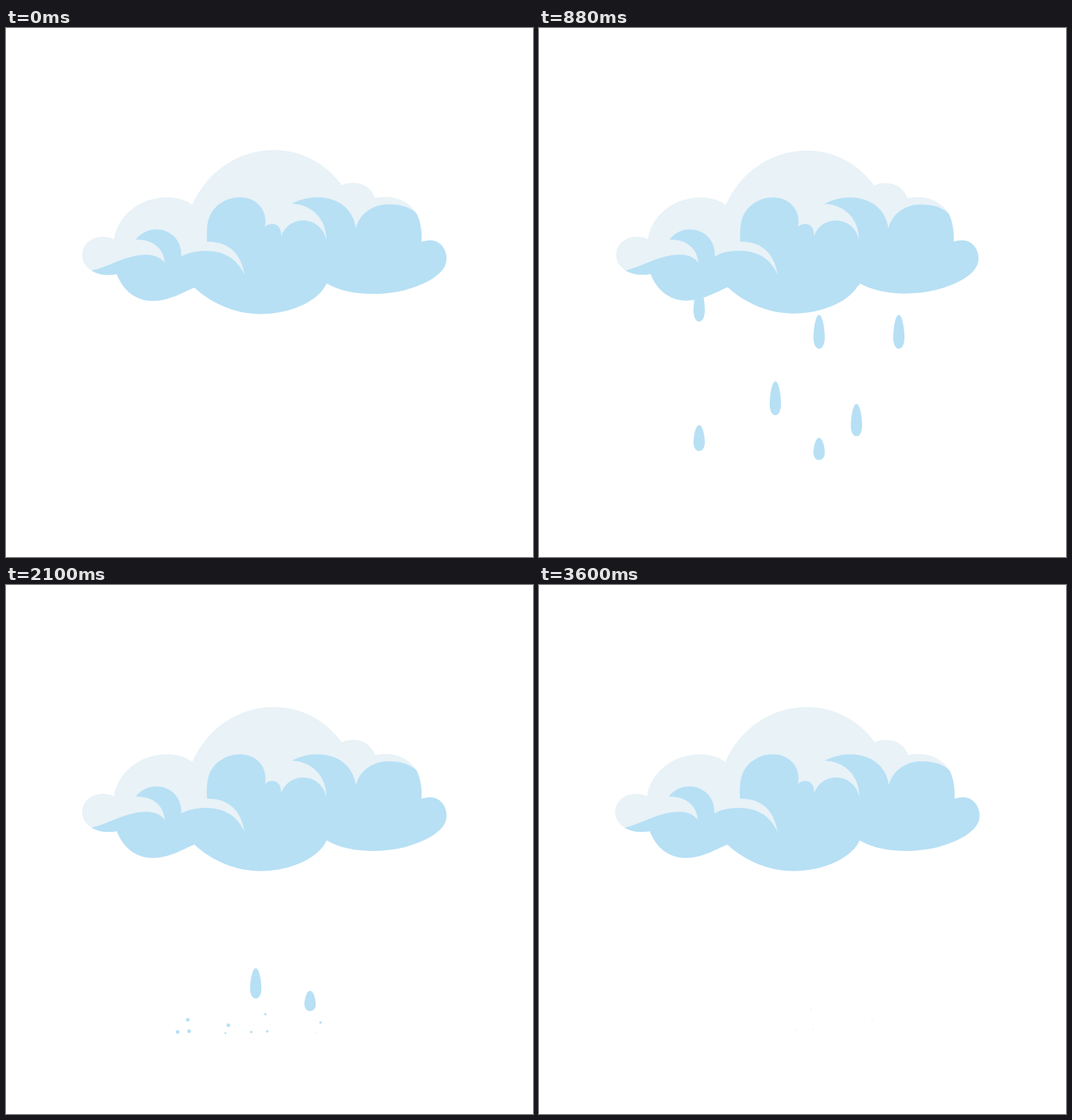
These frames come from a looping animation (747 by 750 pixels, 3.62 s). An HTML page with a canvas:

```html
<!DOCTYPE html>
<html lang="en">
<head>
<meta charset="utf-8">
<title>Rain cloud</title>
<style>
html, body { margin: 0; width: 100%; height: 100%; overflow: hidden; background: #fff; }
canvas { display: block; }
</style>
</head>
<body>
<canvas id="stage" width="747" height="750"></canvas>
<script>
const ctx = document.getElementById('stage').getContext('2d');
const LOOP = 3620;
const LIGHT = '#e8f2f7';
const BLUE = '#b7e0f5';

// Right side and underside, shared by both cloud layers.
const underside = `C587 273 590 288 589 303 C592 302 597 301 601 301 C615 301 624.5 313 624.5 327
  C624.5 340 614 350 600 358 C580 369 553 377 520 377 C495 377 471 372 454.5 362
  C444 386 405 405.5 361 405.5 C326 405.5 292 391 267 368 C250 375 231 387 208 387
  C184 387 166 372 157 349`;
const lightCloud = new Path2D(`M108 322 C108 306 122 296 137 296 C143 296 149 297 153 300
  C158 267 188 240 229 240 C243 240 256 244 264 251 C284 205 328 173 380 173
  C419 173 453 192 476 223 C481 220 487 219.5 493 219.5 C507 219.5 519 228 523 241
  C528 240 533 239.5 539 239.5 C556 239.5 573 248 582 263 ${underside}
  C152 350 148 350 145 350 C124 350 108 338 108 322 Z`);
const blueCloud = new Path2D(`M121 344 C143 340 170 321 200 321.5 C211 322 219 325 225 333
  C224 313 208 299 184 300 C191 291 201 285.5 213 285.5 C234 285.5 250 302 248.5 324
  C259 318 271 316 283 316 C309 316 328 327 338 350 C334 322 317 302 285 303
  C284 289 285 279 287 272 C292 253 311 240 332 240 C356 240 372 260 367 282
  C370 279 375 277 379 278 C387 279 390 285 390 295 C395 281 407 273 421 273
  C437 273 450 283 454 300 C454 270 433 250 405 249 C417 243 429 240 441 240
  C470 240 492 256 496 284 C501 263 520 250 542 250 C560 250 573 254 582 263 ${underside}
  C141 352 130 349 121 344 Z`);

const SPEED = 0.455;
const GROUND = 643;
const DROP_HEIGHT = 48;
const dropShape = new Path2D('M0 0 C5 0 8 20 8 32 C8 41 5 48 0 48 C-5 48 -8 41 -8 32 C-8 20 -5 0 0 0 Z');

// [x, time fully landed, ground offset]
const drops = [
  [397, 1017], [227, 1057], [450, 1123], [335, 1193],
  [397, 1400], [510, 1400], [227, 1485], [450, 1595],
  [279, 1639], [335, 1707], [510, 1782], [367, 1801],
  [399, 1971], [279, 2061], [431, 2217, -15], [354, 2320],
  [310, 3062, -3], [421, 3363, -3]
];

// Start and end of each splash dot, relative to the landing point.
const dots = [
  { from: [3, -10], to: [-60, -9] },
  { from: [4, -11], to: [-34, -10] },
  { from: [4, -7], to: [-37, -39] },
  { from: [9, -9], to: [53, -25] },
  { from: [11, -7], to: [45, -8], small: true }
];

const mix = (a, b, k) => a + (b - a) * k;

function drawDrop(x, ground, timeLeft) {
  const top = ground - timeLeft * SPEED;
  if (timeLeft <= 0 || top < 310) return;
  const shrink = Math.max(0, top - (ground - 117)) * 0.3;
  const height = Math.min(DROP_HEIGHT - shrink, ground - top);
  ctx.save();
  ctx.translate(x, top);
  ctx.scale(1, height / DROP_HEIGHT);
  ctx.fill(dropShape);
  ctx.restore();
}

function drawSplash(x, ground, age) {
  if (age <= 0 || age >= 340) return;
  const spread = 1 - Math.exp(-0.0113 * age);
  for (const { from, to, small } of dots) {
    const radius = small ? 3.3 * Math.exp(-age / 102) : 3.1 * (1 - (age / 340) ** 1.3);
    ctx.beginPath();
    ctx.arc(x + mix(from[0], to[0], spread), ground + mix(from[1], to[1], spread), radius, 0, 2 * Math.PI);
    ctx.fill();
  }
}

function pulse(t) {
  const age = t - 132;
  if (age < 0 || t > 1170) return 1;
  return 1 + 0.408 * Math.exp(-0.005 * age) * Math.sin(2 * Math.PI * age / 394);
}

const stretchKeys = [[2120, 1], [2280, 1.074], [2440, 0.946], [2600, 1.02], [2740, 1]];

function stretch(t) {
  const next = stretchKeys.findIndex(([time]) => t < time);
  if (next < 1) return 1;
  const [t0, a] = stretchKeys[next - 1];
  const [t1, b] = stretchKeys[next];
  return mix(a, b, (1 - Math.cos(Math.PI * (t - t0) / (t1 - t0))) / 2);
}

function scaleAbout(x, y, sx, sy) {
  ctx.translate(x, y);
  ctx.scale(sx, sy);
  ctx.translate(-x, -y);
}

function drawCloud(t) {
  const size = pulse(t);
  ctx.save();
  scaleAbout(366.5, 289, size, size);
  scaleAbout(366.5, 376, 1, stretch(t));
  ctx.fillStyle = LIGHT;
  ctx.fill(lightCloud);
  ctx.fillStyle = BLUE;
  ctx.fill(blueCloud);
  ctx.restore();
}

function frame() {
  const t = performance.now() % LOOP;
  ctx.fillStyle = '#fff';
  ctx.fillRect(0, 0, 747, 750);
  ctx.fillStyle = BLUE;
  for (const [x, landed, offset = 0] of drops) {
    drawDrop(x, GROUND + offset, landed - t);
    drawSplash(x, GROUND + offset, t - landed + 45);
  }
  drawCloud(t);
  requestAnimationFrame(frame);
}
frame();
</script>
</body>
</html>
```
